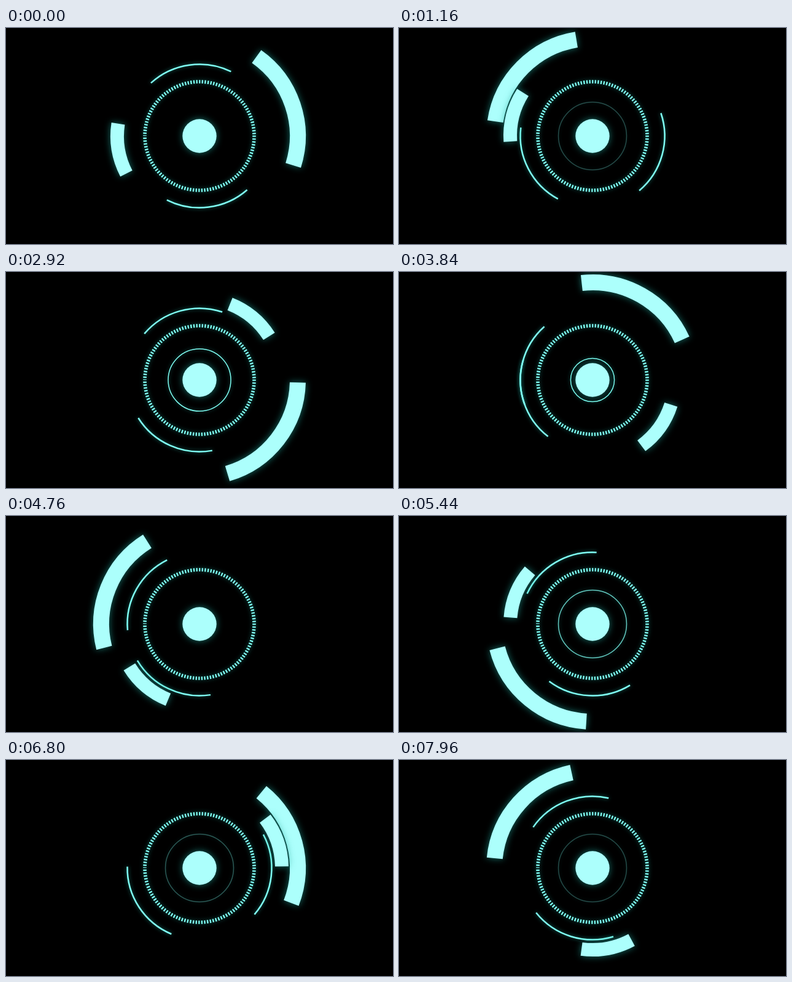
Write an HTML page with a canvas that moves like this. It is 630 by 354 pixels and loops after 8 s.

```html
<!DOCTYPE html>
<html lang="en">
<head>
<meta charset="utf-8">
<title>Radial HUD</title>
<style>
  html, body { margin: 0; width: 100%; height: 100%; overflow: hidden; background: #000; }
  canvas { display: block; width: 630px; height: 354px; }
</style>
</head>
<body>
<canvas id="stage" width="630" height="354"></canvas>
<script>
const ctx = document.getElementById('stage').getContext('2d');
const CX = 315, CY = 177, TAU = Math.PI * 2;
const LOOP = 8000, STEP = 40;
const START = 60, CYCLE = 10160, PULSE = 1133;
const FILL = '#acfffc', LINE = '#80fff4', GLOW = 'rgba(30, 160, 150, 0.7)';

const rad = deg => deg * Math.PI / 180;
const clamp = x => Math.min(1, Math.max(0, x));
const smooth = x => { x = clamp(x); return x * x * (3 - 2 * x); };

// Angles of the two thin arcs, in degrees, at shared times.
const TIMES = [0, 1160, 2920, 4760, 6120, 6800, 7960];
const ARC_A = [261.8, 375.5, 473.9, 569.2, 637.8, 726.3, 827.3];
const ARC_B = [82.8, 152.7, 254.3, 115.3, 92.7, 147, 248.8];

// Smooth curve through the keys (cubic Hermite, uneven spacing).
function curve(keys, t) {
  const last = TIMES.length - 1;
  let i = 0;
  while (i < last - 1 && t >= TIMES[i + 1]) i++;
  const slope = k => {
    const a = Math.max(0, k - 1), b = Math.min(last, k + 1);
    return (keys[b] - keys[a]) / (TIMES[b] - TIMES[a]);
  };
  const span = TIMES[i + 1] - TIMES[i];
  const u = Math.min(1, (t - TIMES[i]) / span), v = 1 - u;
  return keys[i] * v * v * (1 + 2 * u) + keys[i + 1] * u * u * (3 - 2 * u)
    + span * u * v * (slope(i) * v - slope(i + 1) * u);
}

function glow(blur) {
  ctx.shadowColor = GLOW;
  ctx.shadowBlur = blur;
}

// Stroke an arc centred on the angle mid.
function arc(mid, spread, radius, width, color) {
  ctx.beginPath();
  ctx.arc(CX, CY, radius, rad(mid - spread / 2), rad(mid + spread / 2));
  ctx.lineWidth = width;
  ctx.strokeStyle = color;
  ctx.stroke();
}

function ticks() {
  const radius = 89, count = 120, pitch = TAU * radius / count;
  glow(7);
  ctx.setLineDash([pitch / 2, pitch / 2]);
  ctx.lineDashOffset = pitch / 4;
  arc(0, 360, radius, 5.6, LINE);
  ctx.setLineDash([]);
}

function pulse(elapsed) {
  const u = elapsed % PULSE / PULSE;
  const radius = 14.5 + 41 * smooth(u / 0.66);
  if (radius < 27) return;
  ctx.globalAlpha = clamp((1.1 - u) / 0.45);
  glow(6);
  arc(0, 360, radius, 1.5, LINE);
  ctx.globalAlpha = 1;
}

function draw(t) {
  const elapsed = Math.max(0, t - START), p = elapsed / CYCLE;
  ctx.shadowBlur = 0;
  ctx.fillStyle = '#000';
  ctx.fillRect(0, 0, 630, 354);

  ticks();
  pulse(elapsed);

  glow(6);
  arc(curve(ARC_A, t), 68.2, 117.5, 2.5, LINE);
  arc(curve(ARC_B, t), 68.2, 117.5, 2.5, LINE);

  glow(12);
  arc(-18.5 - 1080 * p, 72, 160, 26, FILL);
  arc(170.7 + 720 * smooth(p), 36, 134, 22, FILL);

  ctx.beginPath();
  ctx.arc(CX, CY, 27.7, 0, TAU);
  ctx.fillStyle = FILL;
  ctx.fill();
}

function frame() {
  draw(Math.floor(performance.now() % LOOP / STEP) * STEP);
  requestAnimationFrame(frame);
}
frame();
</script>
</body>
</html>
```
